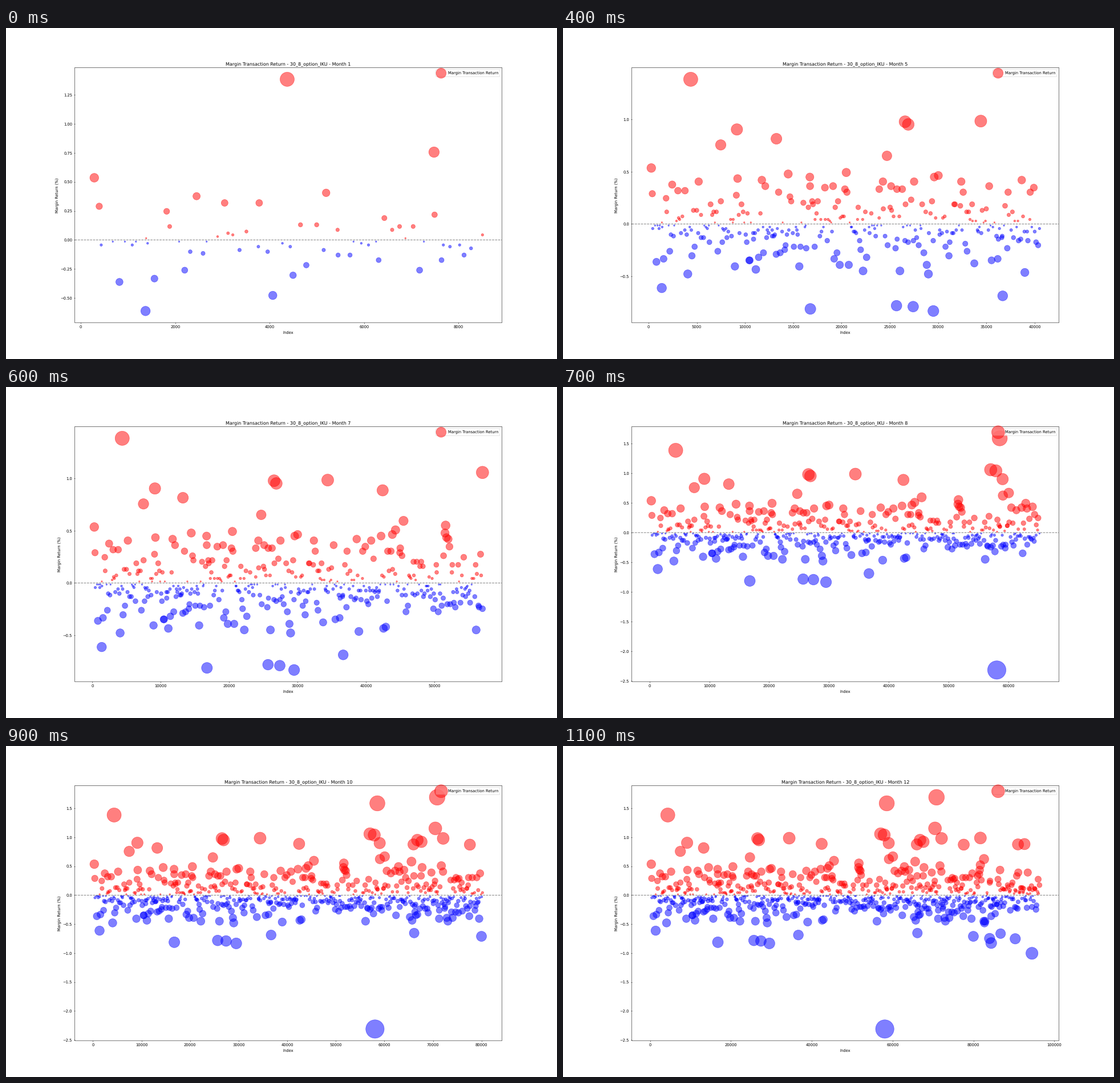
Write a matplotlib script that moves like this. It is 966 px wide and 580 px high and loops after 1200 ms.

```python
import numpy as np
import matplotlib.pyplot as plt
from matplotlib.animation import FuncAnimation

W, H, DPI = 966, 580, 48
SCALE = 48.3 / DPI
TICK = 0.0145
SERIES = "30_8_option_IKU"
FIRST = 287
MONTH_ENDS = [8506, 16200, 23890, 32300, 40496, 48800,
              57048, 65207, 72850, 80197, 88400, 96345]
PER_MONTH = 59

# Outstanding trades: (index, return in percent)
GAINS = [
    (FIRST, 0.536), (4371, 1.385), (7480, 0.757), (9154, 0.905),
    (13247, 0.816), (26572, 0.979), (26903, 0.953), (34415, 0.985),
    (42452, 0.887), (57048, 1.058), (57912, 1.04), (58552, 1.587),
    (59038, 0.9), (65994, 0.877), (66792, 0.952), (67625, 0.922),
    (70489, 1.154), (70865, 1.691), (72109, 0.981), (77603, 0.873),
    (81727, 0.988), (91025, 0.877), (92634, 0.883),
]
LOSSES = [
    (1372, -0.613), (16763, -0.813), (25686, -0.782), (27411, -0.791),
    (29504, -0.833), (36684, -0.688), (58066, -2.312), (66135, -0.654),
    (79986, -0.711), (84000, -0.748), (84395, -0.827), (86722, -0.664),
    (90345, -0.753), (94481, -1.004),
]


def month_trades(rng, start, end):
    """Evenly spread trades up to the month's end, mostly close to zero."""
    slots = np.arange(1, PER_MONTH + 1) - rng.random(PER_MONTH)
    slots[-1] = PER_MONTH
    x = start + slots * (end - start) / PER_MONTH
    gain = rng.random(PER_MONTH) < 0.43
    size = np.where(gain, 0.22, 0.16) * -np.log(1 - 0.95 * rng.random(PER_MONTH))
    size = np.ceil(size / TICK) * TICK
    return np.column_stack([x, np.where(gain, size, -size)])


def build_trades():
    rng = np.random.default_rng(12)
    starts = [FIRST] + MONTH_ENDS[:-1]
    months = [month_trades(rng, a, b) for a, b in zip(starts, MONTH_ENDS)]
    trades = np.vstack([GAINS, LOSSES] + months)
    return trades[np.argsort(trades[:, 0])].T


plt.rcParams.update({"font.family": "DejaVu Sans", "font.size": 10 * SCALE,
                     "text.hinting": "none", "path.snap": False})
index, returns = build_trades()
fig, ax = plt.subplots(figsize=(W / DPI, H / DPI), dpi=DPI)


def draw(i):
    ax.clear()
    shown = index <= MONTH_ENDS[i]
    x, y = index[shown], returns[shown]
    ax.scatter(x, y, s=1000 * SCALE**2 * np.abs(y), alpha=0.5,
               c=np.where(y > 0, "red", "blue"), label="Margin Transaction Return")
    ax.axhline(0, color="gray", linestyle="--", linewidth=1.5)
    ax.set_title(f"Margin Transaction Return - {SERIES} - Month {i + 1}")
    ax.set_xlabel("Index")
    ax.set_ylabel("Margin Return (%)")
    ax.legend(loc="upper right")
    return []


anim = FuncAnimation(fig, draw, frames=12, interval=100, init_func=lambda: [],
                     repeat=True, repeat_delay=0)
plt.show()
```
